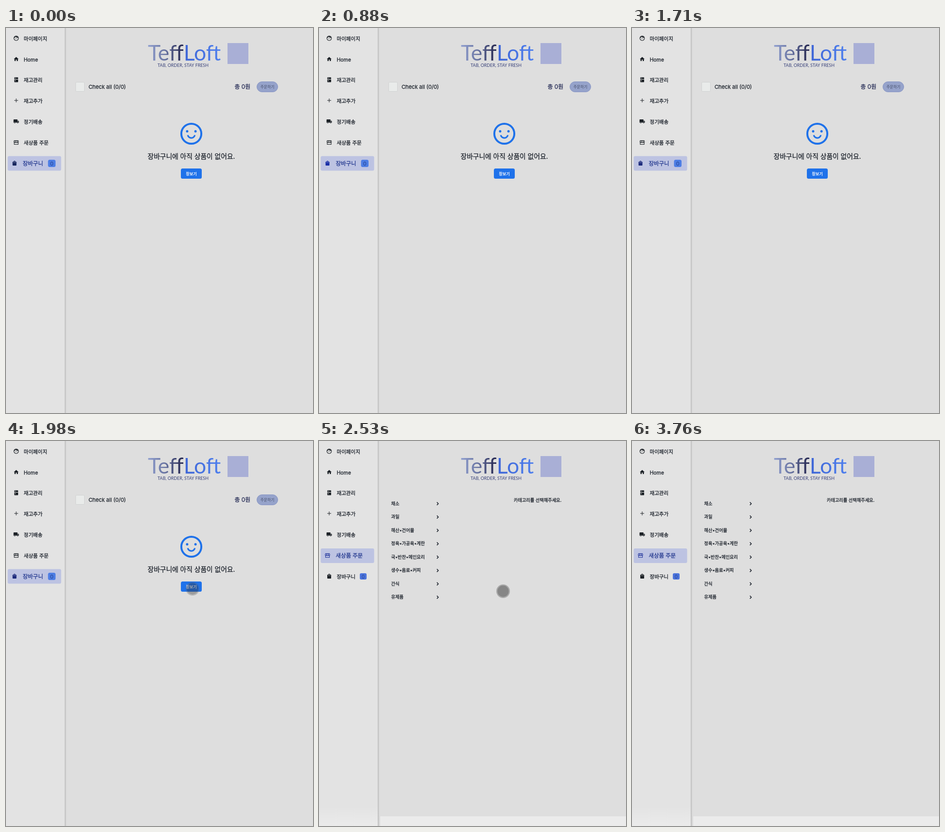
An HTML page with a canvas for the animation above (4160 ms loop, 632x792 px).

```html
<!DOCTYPE html>
<html lang="ko">
<head>
<meta charset="utf-8">
<title>Cart</title>
<style>
html, body { margin: 0; width: 100%; height: 100%; overflow: hidden; background: #dedede; }
canvas { display: block; width: 632px; height: 792px; }
</style>
</head>
<body>
<canvas id="stage" width="632" height="792"></canvas>
<script>
const ctx = document.getElementById('stage').getContext('2d');
const W = 632, H = 792, LOOP = 4160;
const SWITCH = 2120;
const SANS = 'Inter, "Noto Sans CJK KR", "Noto Sans CJK JP", "Noto Sans CJK", sans-serif';
const BAR_FONT = '"Noto Sans", "Noto Sans CJK KR", "Noto Sans CJK JP", sans-serif';
const INK = '#20262f', BLUE = '#1f72ea';

// Icons on a 24-unit grid
const ICONS = {
  home: 'M10 20v-6h4v6h5v-8h3L12 3 2 12h3v8z',
  fridge: 'M4 9V4a2 2 0 0 1 2-2h12a2 2 0 0 1 2 2v5zM4 11h16v9a2 2 0 0 1-2 2H6a2 2 0 0 1-2-2zM7 4v3h2V4zM7 13v5h2v-5z',
  plus: 'M11 4h2v7h7v2h-7v7h-2v-7H4v-2h7z',
  truck: 'M20 8h-3V4H3a2 2 0 0 0-2 2v11h2a3 3 0 0 0 6 0h6a3 3 0 0 0 6 0h2v-5z' +
    'M6 18.5a1.5 1.5 0 1 1 0-3 1.5 1.5 0 0 1 0 3zM18 18.5a1.5 1.5 0 1 1 0-3 1.5 1.5 0 0 1 0 3zM19.5 9.5L21.5 12H17V9.5z',
  bag: 'M18 6h-2a4 4 0 0 0-8 0H6a2 2 0 0 0-2 2v12a2 2 0 0 0 2 2h12a2 2 0 0 0 2-2V8a2 2 0 0 0-2-2z' +
    'M12 4a2 2 0 0 1 2 2h-4a2 2 0 0 1 2-2zM8 8v2a1 1 0 0 0 2 0V8zM14 8v2a1 1 0 0 0 2 0V8z',
  shop: 'M4 4h16l1.5 6.5a2.5 2.5 0 0 1-4.5 0 2.5 2.5 0 0 1-5 0 2.5 2.5 0 0 1-5 0 2.5 2.5 0 0 1-4.5 0zM4 13v7h16v-7M9 4v6M15 4v6',
  face: 'M21.5 12a9.5 9.5 0 1 1-19 0 9.5 9.5 0 0 1 19 0z',
  hair: 'M3.5 10.5C7 10 9 8 10 6c2 3 5 4.5 10.5 4A9 9 0 0 0 3.5 10.5z'
};
const STROKED = ['shop', 'face'];
const paths = Object.fromEntries(Object.entries(ICONS).map(([k, d]) => [k, new Path2D(d)]));

const MENU = [
  ['face', '마이페이지', 21.5], ['home', 'Home', 64.5], ['fridge', '재고관리', 107],
  ['plus', '재고추가', 149.5], ['truck', '정기배송', 192.5], ['shop', '새상품 주문', 236], ['bag', '장바구니', 278.5]
];
const CATEGORIES = ['채소', '과일', '해산•건어물', '정육•가공육•계란', '국•반찬•메인요리', '생수•음료•커피', '간식', '유제품'];

const clamp = v => Math.max(0, Math.min(1, v));
const ramp = (t, a, b) => clamp((t - a) / (b - a));

function text(s, x, y, size, color = INK, weight = 400, align = 'left', family = SANS) {
  ctx.font = `${weight} ${size}px ${family}`;
  ctx.fillStyle = color;
  ctx.textAlign = align;
  ctx.textBaseline = 'alphabetic';
  ctx.fillText(s, x, y);
}

// Regular weight thickened by a hairline outline
function label(s, x, y, size, color = INK) {
  text(s, x, y, size, color);
  ctx.strokeStyle = color;
  ctx.lineWidth = .3;
  ctx.strokeText(s, x, y);
}

function box(x, y, w, h, r, fill, stroke) {
  ctx.beginPath();
  ctx.roundRect(x, y, w, h, r);
  ctx.fillStyle = fill;
  ctx.fill();
  if (stroke) {
    ctx.strokeStyle = stroke;
    ctx.lineWidth = 1;
    ctx.stroke();
  }
}

function dot(x, y, r, fill) {
  ctx.beginPath();
  ctx.arc(x, y, r, 0, Math.PI * 2);
  ctx.fillStyle = fill;
  ctx.fill();
}

function gradient(x0, y0, x1, y1, ...colors) {
  const g = ctx.createLinearGradient(x0, y0, x1, y1);
  colors.forEach((c, i) => g.addColorStop(i / (colors.length - 1), c));
  return g;
}

function icon(name, cx, cy, color) {
  ctx.save();
  ctx.translate(cx - 6, cy - 6);
  ctx.scale(.5, .5);
  ctx.fillStyle = ctx.strokeStyle = color;
  ctx.lineWidth = 2.2;
  if (STROKED.includes(name)) ctx.stroke(paths[name]);
  else ctx.fill(paths[name], 'evenodd');
  if (name === 'face') {
    ctx.fill(paths.hair);
    dot(9, 14, 1.3, color);
    dot(15, 14, 1.3, color);
  }
  ctx.restore();
}

function sidebar(active, t) {
  box(0, 0, 121, H, 0, '#e3e3e3');
  if (active === 5) box(0, 752, 121, 40, 0, gradient(0, 752, 0, H, '#e3e3e3', '#ebebeb'));
  box(121, 0, 5, H, 0, gradient(121, 0, 126, 0, '#b0b0b0', '#cfcfcf', '#dadada', '#dedede'));
  MENU.forEach(([name, title, y], i) => {
    const on = i === active;
    if (on) box(3.5, y - 15, 110, 30, 3, '#bdc3e2');
    let color = on ? '#24379c' : '#1c2126';
    if (on && name === 'bag') color = t < 670 ? '#15245c' : t < 1230 ? '#182da6' : '#1c2a7c';
    icon(name, on ? 17.5 : 21, y - .5, color);
    label(title, on ? 34.5 : 36.5, y + (on ? 4.2 : 4), on ? 11.4 : 10.5, on ? '#24398f' : INK);
  });
  if (active === 6) box(86.5, 271, 15.5, 15, 3.5, '#4d7de4');
  else box(84, 272, 14, 13, 3, '#4c74dc');
  text('0', active === 6 ? 94.2 : 91, 282.5, active === 6 ? 11 : 10, '#24408f', 400, 'center');
}

function logo() {
  const size = 44.5, family = 'Lato, sans-serif';
  ctx.font = `400 ${size}px ${family}`;
  const mid = 292 + ctx.measureText('Teff').width;
  text('Teff', 292, 67, size, gradient(292, 0, mid, 0, '#92a1d0', '#66719f', '#20224c'), 400, 'left', family);
  text('Loft', mid, 67, size, gradient(mid, 0, 444, 0, '#3f66d6', '#4f80ee'), 400, 'left', family);
  text('TAB, ORDER, STAY FRESH', 312, 80, 8.9, '#39427a', 400, 'left', family);
  box(456, 31, 43, 43, 0, '#a9afd6');
}

function smiley(x, y) {
  ctx.strokeStyle = BLUE;
  ctx.lineWidth = 4;
  ctx.beginPath();
  ctx.arc(x, y, 20.6, 0, Math.PI * 2);
  ctx.stroke();
  ctx.lineWidth = 3.2;
  ctx.beginPath();
  ctx.arc(x, y + 1, 7.6, .25, Math.PI - .25);
  ctx.stroke();
  dot(x - 8.6, y - 5, 2.5, BLUE);
  dot(x + 8.6, y - 5, 2.5, BLUE);
}

function cartPage() {
  box(143.5, 111.5, 18, 19, 2, '#e9ebea', '#d0d2d2');
  label('Check all (0/0)', 170, 125, 11);
  label('총 0원', 470.5, 125, 11.9, '#2b315a');
  box(516.5, 110.5, 43, 21, 10.5, '#96a3cb', '#8795c4');
  text('주문하기', 538, 124, 7.8, '#424b66', 400, 'center');
  smiley(381.5, 217.5);
  label('장바구니에 아직 상품이 없어요.', 291.5, 269.2, 13.75);
  box(360, 289, 43, 21, 3.5, BLUE);
  text('장보기', 381.5, 302.8, 8.2, '#f2f5fb', 700, 'center');
}

function shopPage() {
  box(123, 772, W - 123, 20, 0, '#ebebeb');
  CATEGORIES.forEach((name, i) => {
    const y = 128.5 + i * 27.5;
    label(name, 148.5, y + 3.3, 9.2);
    ctx.strokeStyle = INK;
    ctx.lineWidth = 1.5;
    ctx.beginPath();
    ctx.moveTo(242.7, y - 2.6);
    ctx.lineTo(245.7, y + .4);
    ctx.lineTo(242.7, y + 3.4);
    ctx.stroke();
  });
  label('카테고리를 선택해주세요.', 401, 124.7, 9.2);
}

function statusBar() {
  box(0, 769, 207, 24, [0, 4, 0, 0], '#50565e');
  text('i10a101.p.ssafy.io의 응답을...', 0, 788, 15, '#d9e2ec', 400, 'left', BAR_FONT);
}

function touch(t) {
  const alpha = ramp(t, 1780, 2050) * (t < 2800 ? 1 : t < 2870 ? .5 : t < 3150 ? .06 : 0);
  if (!alpha) return;
  const drag = ramp(t, 2360, 2530);
  const x = 384 - 5 * drag;
  const y = 304 + ramp(t, 1980, 2260) + 4 * drag;
  ctx.globalAlpha = alpha;
  dot(x, y, 11.7, 'rgba(50,50,50,.51)');
  ctx.beginPath();
  ctx.arc(x, y, 12.8, 0, Math.PI * 2);
  ctx.strokeStyle = 'rgba(90,90,90,.4)';
  ctx.lineWidth = 2.4;
  ctx.stroke();
  ctx.globalAlpha = 1;
}

function draw(t) {
  const shop = t >= SWITCH;
  box(0, 0, W, H, 0, '#dedede');
  if (shop) shopPage();
  else cartPage();
  logo();
  sidebar(shop ? 5 : 6, t);
  if (t >= 2190 && t < 2460) statusBar();
  touch(t);
}

const start = performance.now();
function tick() {
  draw((performance.now() - start) % LOOP);
  requestAnimationFrame(tick);
}
tick();
</script>
</body>
</html>
```
